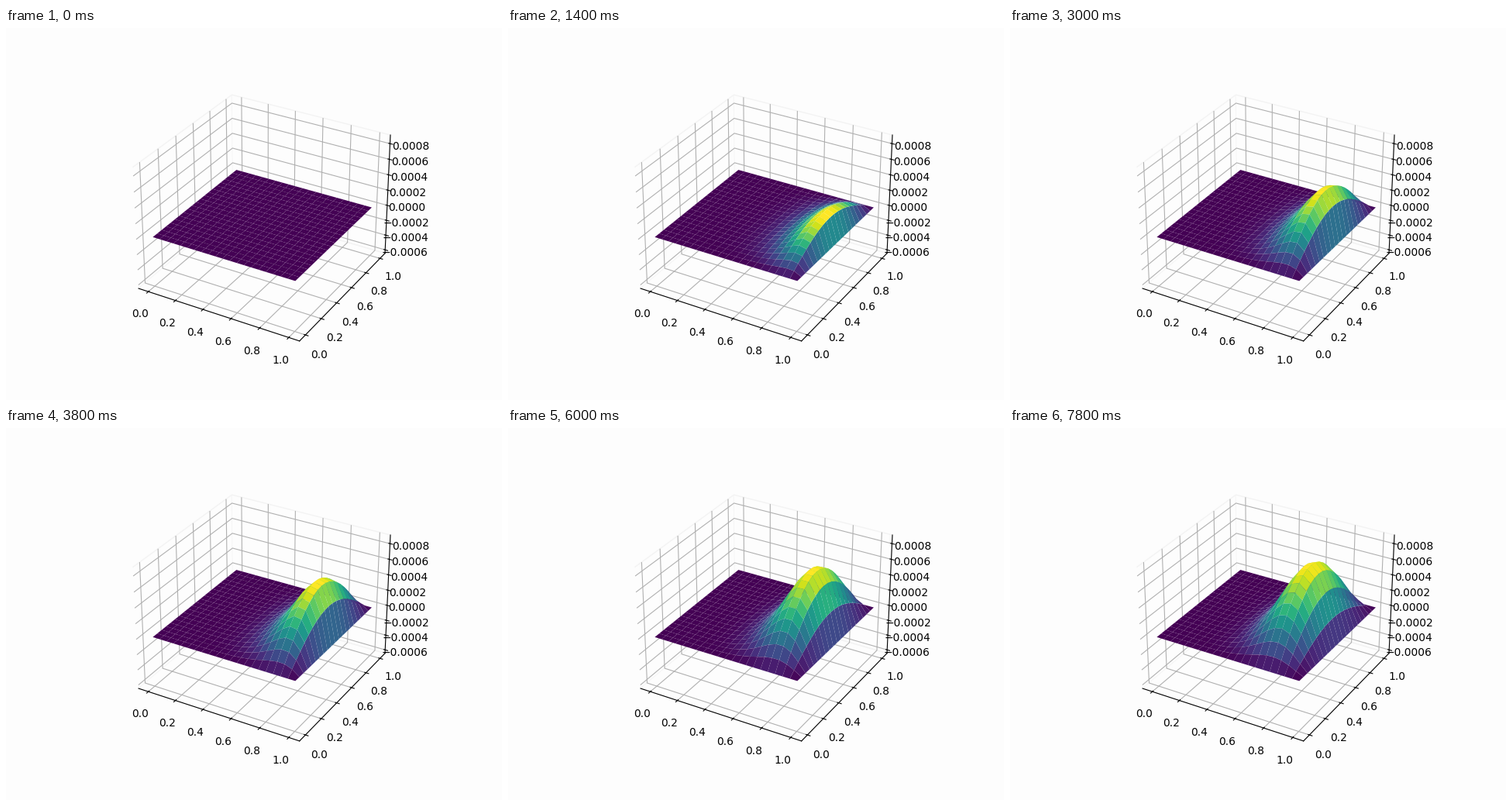
A matplotlib script that plays this animation: 640 by 480 pixels, repeating every 8000 ms.

```python
import numpy as np
import matplotlib.pyplot as plt
from matplotlib.animation import FuncAnimation

FRAMES, STEP = 40, 200          # frame count, ms per frame
BACK = "#fdfdfd"
CELLS = 20

fig = plt.figure(figsize=(6.4, 4.8), dpi=100, facecolor=BACK)
ax = fig.add_subplot(projection="3d", facecolor=BACK)

pad = 0.05 + 1.1 / 48
ax.set_xlim(-pad, 1 + pad)
ax.set_ylim(-pad, 1 + pad)
ax.set_zlim(-0.000647, 0.000909)
for axis in (ax.xaxis, ax.yaxis, ax.zaxis):
    axis.set_pane_color((0.992, 0.992, 0.992, 1))
    axis.pane.set_edgecolor("#f3f3f3")

line = np.linspace(0, 1, CELLS + 1)
X, Y = np.meshgrid(line, line)
surface = None


def height(t):
    """Bump that rises at the edge x = 1 and drifts inwards; t in seconds."""
    amp = 0.00091 * (1 - np.exp(-(t / 2.7) ** 1.15))
    peak = 0.058 + 0.0192 * t       # distance of the crest from the edge
    rise = 0.98 + 0.028 * t         # steepness next to the edge
    fall = 0.85 + 0.145 * t         # exponential tail turning Gaussian
    r = (1 - X) / peak
    profile = r ** rise * np.exp(rise / fall * (1 - r ** fall))
    return amp * profile * np.sin(np.pi * Y)


def draw(i):
    global surface
    if surface is not None:
        surface.remove()
    surface = ax.plot_surface(X, Y, height(i * STEP / 1000), cmap="viridis")
    return (surface,)


anim = FuncAnimation(fig, draw, frames=FRAMES, interval=STEP,
                     init_func=lambda: draw(0), repeat=True, repeat_delay=0)
plt.show()
```
